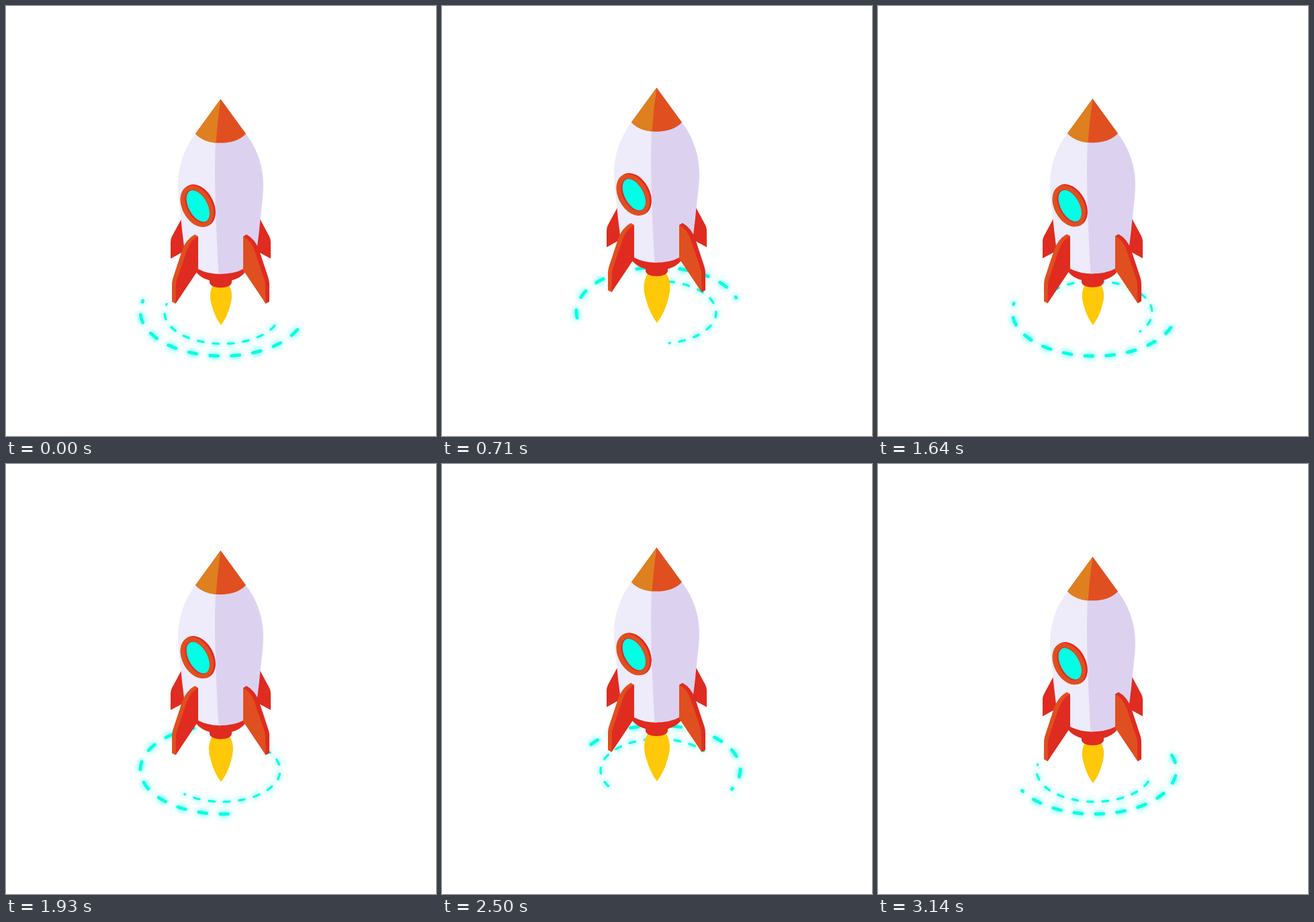
Animation of 640x640 px, one loop 3210 ms. Source, as an HTML page:

```html
<!DOCTYPE html>
<html lang="en">
<head>
<meta charset="utf-8">
<title>Rocket</title>
<style>
  html, body { margin: 0; width: 100%; height: 100%; overflow: hidden; background: #fff; }
  svg { display: block; width: 100vw; height: 100vh; }
  .ring { fill: none; stroke: #00ffe4; stroke-linecap: round; filter: drop-shadow(0 0 5px #00ffe4); }
  .red { fill: #e02b20; }
  .orange { fill: #e04f20; }
  .amber { fill: #de7f20; }
  .light { fill: #eeebfa; }
  .shade { fill: #dcd2f0; }
  .cyan { fill: #00ffe4; }
  .fire { fill: #ffc808; }
</style>
</head>
<body>
<svg viewBox="0 0 640 640">
  <defs>
    <path id="backFin" d="M261 317 L247 343 Q245 347 245 351 V376 L267 364 Z"/>
    <path id="finEdge" d="M281 340 L286 343 L270 400 L252.500 443 L247 440 V414 Q247 410 248.500 405 L262 364 Q268 347 281 340 Z"/>
    <path id="finFace" d="M286 343 Q275 348 269 364 L254.500 407 Q253 411 253 416 L252.500 443 L284 396 L286 394 Z"/>
    <clipPath id="hole"><ellipse rx="15.500" ry="26.500"/></clipPath>
  </defs>

  <ellipse class="ring" id="outer" cx="322" cy="455" rx="122" ry="66" pathLength="360" stroke-width="4.800"/>
  <ellipse class="ring" id="inner" cx="322" cy="456" rx="86" ry="46.700" pathLength="360" stroke-width="3.300"/>

  <g id="rocket">
    <g id="flame">
      <path class="fire" d="M-9 0 C-17 10 -18 22 -13 37 Q-9 52 0 64 Q9 52 13 37 C18 22 17 10 9 0 Z"/>
    </g>

    <g class="red">
      <use href="#backFin"/>
      <use href="#backFin" transform="translate(639) scale(-1 1)"/>
      <path d="M283 388 V396 Q290 405 303 408.500 V411 C303 422 336 422 336 411 V408.500 Q349 405 356 396 V388 Z"/>
    </g>

    <path class="light" d="M282 190 C264 214 256 240 256 267 C256 285 260 309 262 333 L266 366 L285 391 Q300 399 319.500 399 V190 Z"/>
    <path class="shade" d="M312 200 C310 250 311 300 316.500 399 Q340 399 354 391 L373 366 L377 333 C379 309 383 285 383 267 C383 240 375 214 357 190 Z"/>

    <path class="orange" d="M319.500 138.500 L357 190 C342 208.500 297 208.500 282 190 Z"/>
    <path class="amber" d="M319.500 138.500 L282 190 Q293 202 312.500 204 Q315 170 319.500 138.500 Z"/>

    <g transform="translate(286.500 297) rotate(-28)">
      <ellipse class="red" rx="22.600" ry="33.500"/>
    </g>
    <g transform="translate(284.300 298) rotate(-28)">
      <ellipse class="orange" rx="22" ry="33"/>
    </g>
    <g transform="translate(284.800 298) rotate(-28)">
      <ellipse class="red" rx="15.500" ry="26.500"/>
      <g clip-path="url(#hole)"><ellipse class="cyan" cx="1" cy=".3" rx="14" ry="25.500"/></g>
    </g>

    <use class="orange" href="#finEdge"/>
    <use class="red" href="#finFace"/>
    <g transform="translate(639) scale(-1 1)">
      <use class="red" href="#finEdge"/>
      <use class="orange" href="#finFace"/>
    </g>
  </g>
</svg>
<script>
  const LOOP = 3210;
  const byId = id => document.getElementById(id);
  const [outer, inner, rocket, flame] = ['outer', 'inner', 'rocket', 'flame'].map(byId);

  // Nine dashes and a stub, in degrees of the ring's length; the rest is a gap.
  const DASH = 7.15, GAP = 11.92, STUB = 0.9;
  const dashes = Array(9).fill([DASH, GAP]).flat();
  const rest = 360 - 9 * (DASH + GAP) - STUB;
  for (const ring of [outer, inner]) {
    ring.setAttribute('stroke-dasharray', [...dashes, STUB, rest].join(' '));
  }

  const turn = (ring, angle) => ring.setAttribute('stroke-dashoffset', -(angle % 360));

  // Motion runs at 25 steps per second and is shown at 14 pictures per second.
  function stepAt(time) {
    const shown = Math.floor((Math.floor(time / 10) + 0.5) * 0.14);
    return Math.ceil((shown + 0.5) * 25 / 14) - 1;
  }

  function draw(time) {
    const n = stepAt(time);
    turn(outer, 17.5 + 8.72 * n);
    turn(inner, 18.5 + 13.63 * n);

    const lift = (1 - Math.cos((9.5 * n - 9) * Math.PI / 180)) / 2;
    rocket.setAttribute('transform', `translate(0 ${0.1 - 17.5 * lift})`);
    flame.setAttribute('transform', `translate(320 411) scale(${1 + 0.22 * lift})`);
  }

  const start = performance.now();
  function tick() {
    draw((performance.now() - start) % LOOP);
    requestAnimationFrame(tick);
  }
  tick();
</script>
</body>
</html>
```
